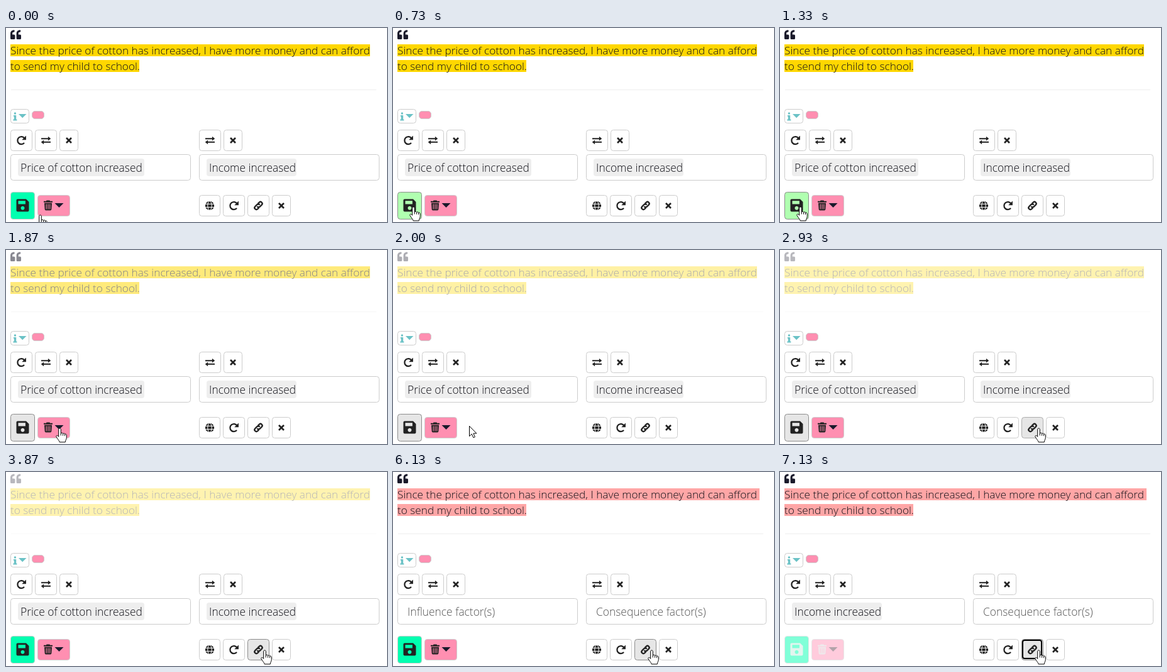
Write an HTML page that moves like this. It is 606 px wide and 309 px high and loops after 7940 ms.

```html
<!DOCTYPE html>
<html lang="en">
<head>
<meta charset="utf-8">
<title>Coding form</title>
<style>
  html, body { margin: 0; width: 100%; height: 100%; overflow: hidden; background: #fff; }
  svg { display: block; }
  text { font: 300 17.4px "Open Sans", "Noto Sans", sans-serif; fill: #111118; white-space: pre; }
  #quote text { font-size: 17.23px; }
  .hint { fill: #555; }
  .box { fill: #fff; stroke: #ccc; }
  .ico { fill: #222; stroke: none; }
  .line { fill: none; stroke: #222; stroke-width: 2.1; }
</style>
</head>
<body>
<svg id="stage" width="606" height="309" viewBox="0 0 606 309"></svg>
<script>
const LOOP = 7940, FPS = 15;
const GREEN = '#00ffb0', PINK = '#ff8fb1', GREY = '#e6e6e6', TEAL = '#6bc2c6';

const icons = {
  redo: `<g transform="scale(1.08)"><path class="line" d="M4.6-3A5.6 5.6 0 1 0 4.2 3.8"/><path class="ico" d="M6.9-7v6.2H.7z"/></g>`,
  swap: `<path class="line" d="M-7.5-2.8H4M7.5 2.8H-4"/>
    <path class="ico" d="M3.4-6.2L7.8-2.8 3.4.6zM-3.4-.6L-7.8 2.8-3.4 6.2z"/>`,
  cross: `<path class="line" style="stroke-width:2.7" d="M-4-4L4 4M4-4L-4 4"/>`,
  globe: `<circle class="ico" r="7.2"/><g fill="none" stroke="#fff">
    <ellipse rx="3.2" ry="7.4"/><path d="M-7.2-2.6H7.2M-7.2 2.6H7.2"/></g>`,
  link: `<g class="line" style="stroke-width:2.4" transform="rotate(-45)"><path d="M-1.6 2.8H-4.6A2.8 2.8 0 0 1-4.6-2.8H-.4A2.8 2.8 0 0 1 2.3.6"/>
    <path d="M1.6-2.8H4.6A2.8 2.8 0 0 1 4.6 2.8H.4A2.8 2.8 0 0 1-2.3-.6"/></g>`,
  save: `<path fill-rule="evenodd" d="M-8-10H5.5L10-5.5V8a2 2 0 0 1-2 2H-8a2 2 0 0 1-2-2V-8a2 2 0 0 1 2-2zM-7-7.2V-2H4.4V-7.2zM0 1.2a3 3 0 1 0 .01 0z"/>`,
  trash: `<path fill-rule="evenodd" d="M-7-6.8H-3.2L-2.4-8H2.4L3.2-6.8H7V-4.8H-7zM-6-3.8H6L5.3 6.6A1.6 1.6 0 0 1 3.7 8H-3.7A1.6 1.6 0 0 1-5.3 6.6zM-3.4-2V6H-2.3V-2zM-.5-2V6H.6V-2zM2.3-2V6H3.4V-2z"/>`
};

const at = (x, y, body, id = '') => `<g ${id && `id="${id}"`} transform="translate(${x} ${y})">${body}</g>`;
const box = (x, y, w, h, id = '') =>
  `<rect ${id && `id="${id}"`} class="box" x="${x + .5}" y="${y + .5}" width="${w - 1}" height="${h - 1}" rx="4"/>`;
const button = (icon, x, y, w, id) => box(x, y, w, 34, id) + at(x + w / 2, y + 17, icons[icon]);
const chip = (id, x, w, label) => `<g id="${id}"><rect x="${x}" y="208" width="${w}" height="28" rx="4" fill="#eee"/>
  <text x="${x + 4}" y="229">${label}</text></g>`;
const hint = (id, x, label) => `<text id="${id}" class="hint" x="${x}" y="229">${label}</text>`;

const mark = `<path fill="#1a1a2b" d="M0 13.4V5.5A5.3 5.3 0 0 1 5.3.2h.5a.8.8 0 0 1 .8.8v1.6a.8.8 0 0 1-.8.8h-.5A2 2 0 0 0 3.2 5.5v2H5.8A1.6 1.6 0 0 1 7.4 9.1v4.3A1.6 1.6 0 0 1 5.8 15H1.6A1.6 1.6 0 0 1 0 13.4z"/>`;
const hand = `<path d="M0 0C1.3 0 1.8.8 1.8 1.9V8c.9-1 2.8-.8 3.3.4 1-.8 2.6-.4 3 .8 1.2-.5 2.7.2 2.7 1.6v4c0 3-2 4.5-2 7.2H-.4c0-2-2.6-4-5.1-8.5-.8-1.6 1.2-2.8 2.6-1.5l1.1 1.4V1.9C-1.8.8-1.3 0 0 0z"/>
  <path d="M1.8 8v3.5M5.1 8.4v3.4M8.1 9.2v3"/>`;
const arrow = `<path d="M0 0V16.2L3.8 12.6 6.4 18.4 8.9 17.3 6.4 11.6H11.4z"/>`;

stage.innerHTML = `
  <g id="quote">
    ${at(7, 3, mark)}${at(16.6, 3, mark)}
    <g id="marker"><rect id="row" x="7" y="26" height="19"/><rect x="7" y="51" width="205" height="19"/></g>
    <text x="7" y="42">Since the price of cotton has increased, I have more money and can afford</text>
    <text x="7" y="67">to send my child to school.</text>
    <path stroke="#eee" d="M8 98.5H589"/>
  </g>
  ${box(7, 129, 30, 23)}
  <path fill="${TEAL}" d="M12 139h4.2v6.6h1.2v2H11.4v-2h1.4v-4.6H12zM20 137H32.5L26.2 143.3z"/>
  <circle cx="14.4" cy="136" r="1.7" fill="${TEAL}"/>
  <rect x="41.5" y="132.5" width="19" height="12" rx="4.5" fill="${PINK}" stroke="#ccc"/>
  ${button('redo', 7, 162, 35)}${button('swap', 46, 162, 35)}${button('cross', 85, 162, 30)}
  ${button('swap', 307, 162, 35)}${button('cross', 346, 162, 30)}
  ${box(7, 201, 287, 42)}${box(307, 201, 287, 42)}
  ${chip('cause', 19, 201, 'Price of cotton increased')}
  ${chip('next', 19, 143, 'Income increased')}
  ${chip('effect', 319, 143, 'Income increased')}
  ${hint('causeHint', 23, 'Influence factor(s)')}
  ${hint('effectHint', 323, 'Consequence factor(s)')}
  ${box(7, 261, 39, 44, 'save')}${at(26.5, 282.5, icons.save, 'saveIcon')}
  ${box(50, 266, 52, 34, 'bin')}
  ${at(67, 282.5, icons.trash, 'binIcon')}<path id="caret" d="M77.5 279H91.5L84.5 286z"/>
  ${button('globe', 307, 266, 34, 'globe')}${button('redo', 345, 266, 35, 'redo')}
  ${button('link', 384, 266, 35, 'link')}${button('cross', 423, 266, 30)}
  <rect id="ring" x="386" y="268" width="30" height="29" rx="3" fill="none" stroke="#000" stroke-width="2"/>
  <g id="cursor" fill="#fff" stroke="#000" stroke-linejoin="round">${at(-1, -.5, hand, 'hand')}<g id="arrow">${arrow}</g></g>`;

const $ = id => document.getElementById(id);
const set = (id, attrs) => { for (const k in attrs) $(id).setAttribute(k, attrs[k]); };
const paint = (id, fill, stroke) => { $(id).style.fill = fill; if (stroke) $(id).style.stroke = stroke; };
const show = (id, on) => { $(id).style.display = on ? '' : 'none'; };

// pointer path: tick, x, y
const path = [[0, 55, 298], [1, 50, 295], [5, 27, 287], [7, 31, 285], [11, 33, 285], [22, 33, 285],
  [26, 62, 288], [28, 86, 284], [30, 121, 280], [32, 190, 282], [34, 267, 287],
  [36, 325, 288], [39, 378, 287], [44, 412, 284], [120, 412, 284]];

function pointer(n) {
  const i = path.findIndex(p => p[0] > n);
  const [t0, x0, y0] = path[i - 1], [t1, x1, y1] = path[i], k = (n - t0) / (t1 - t0);
  return [x0 + (x1 - x0) * k, y0 + (y1 - y0) * k].map(Math.round);
}

function draw(t) {
  const n = Math.floor(t * FPS / 1000 + .06);   // screen updates at 15 per second
  const [x, y] = pointer(n);
  const over = (l, r) => x >= l && x < r;
  const cleared = n >= 92, refilled = n >= 101;

  $('quote').style.opacity = n < 23 || cleared ? 1 : Math.max(.31, 1 - .08 * (n - 22));
  set('marker', { fill: cleared ? '#ffa6a6' : '#ffd700' });
  set('row', { width: cleared ? 576 : 572 });

  show('cause', !cleared);
  show('effect', !cleared);
  show('causeHint', cleared && !refilled);
  show('effectHint', cleared);
  show('next', refilled);

  if (refilled) paint('save', '#80ffd8', '#e6e6e6');
  else if (n >= 24 && n < 55) paint('save', GREY, '#8c8c8c');
  else if (over(7, 46)) paint('save', '#b0ffb0', n < 11 ? '#adadad' : '#8c8c8c');
  else paint('save', GREEN, '#ccc');
  paint('saveIcon', refilled ? '#e2f5ef' : '#222');
  paint('bin', refilled ? '#ffcbdc' : PINK, refilled ? '#e6e6e6' : '#ccc');
  paint('binIcon', refilled ? '#eeeaec' : '#222');
  paint('caret', refilled ? '#b3a3aa' : '#1a1a2b');

  for (const [id, l, r] of [['globe', 307, 341], ['redo', 345, 380], ['link', 384, 419]])
    paint(id, over(l, r) ? GREY : '#fff', over(l, r) ? (n >= 58 ? '#8c8c8c' : '#adadad') : '#ccc');
  show('ring', n >= 107);

  const press = over(7, 46) || over(50, 102) || over(307, 341) || over(345, 380) || over(384, 419);
  show('hand', press);
  show('arrow', !press);
  set('cursor', { transform: `translate(${x + .5} ${y + .5})` });
}

function tick() {
  draw(performance.now() % LOOP);
  requestAnimationFrame(tick);
}
tick();
</script>
</body>
</html>
```
